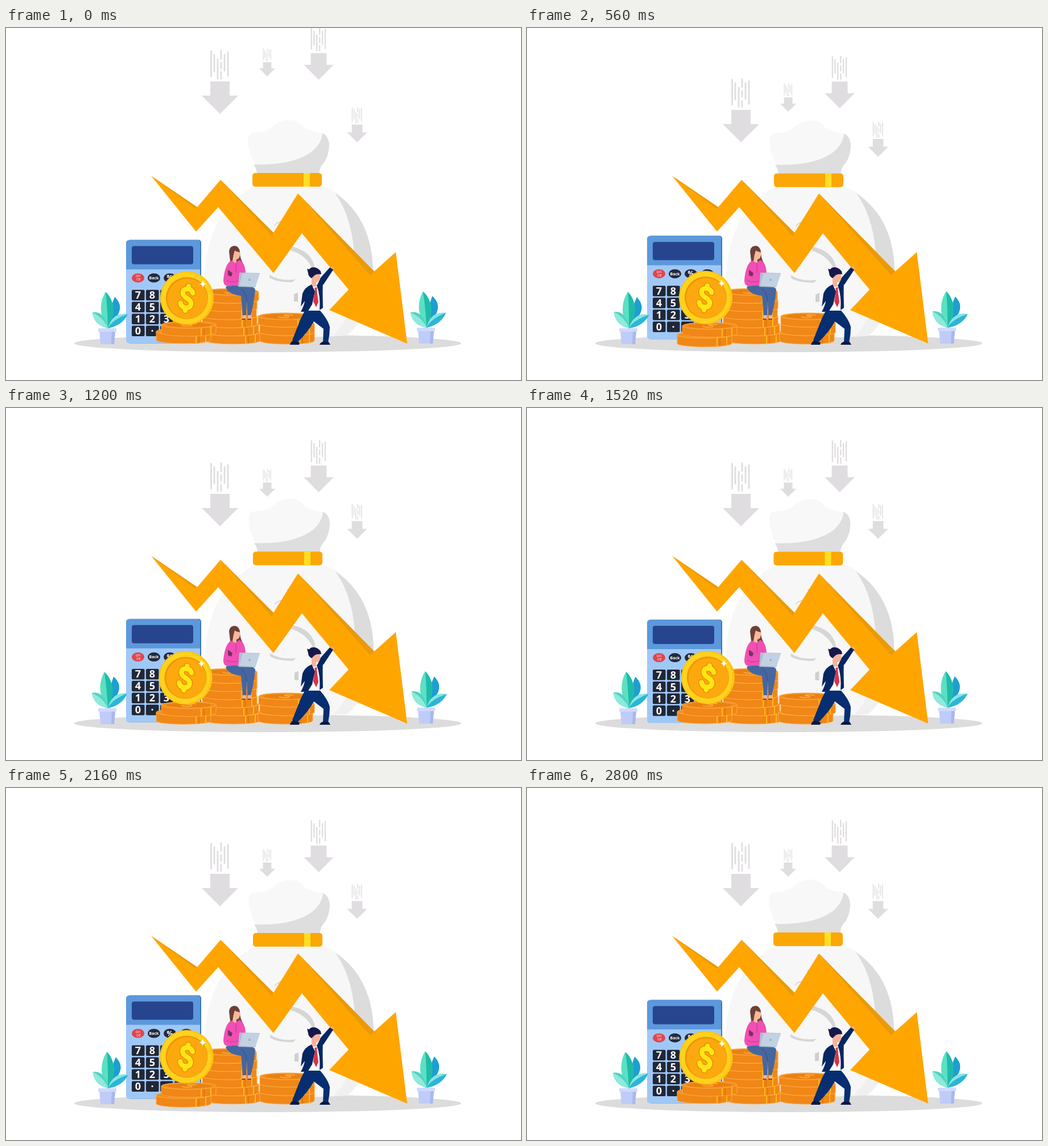
These frames come from a looping animation (905 by 619 pixels, 2880 ms). An HTML page:

```html
<!DOCTYPE html>
<html lang="en">
<head>
<meta charset="utf-8">
<title>Falling market</title>
<style>
html, body { margin: 0; width: 100%; height: 100%; overflow: hidden; background: #fff }
svg { display: block; width: 905px; height: 619px }
text { font-family: "Open Sans", "Noto Sans", sans-serif; font-weight: 700; text-anchor: middle; fill: #fff }
</style>
</head>
<body>
<svg id="stage" viewBox="0 0 905 619"></svg>
<script>
const LOOP = 2880, STEP = 80;
const path = (d, fill, extra = '') => `<path d="${d}" fill="${fill}" ${extra}/>`;
const line = (d, color, width) => path(d, 'none', `stroke="${color}" stroke-width="${width}" stroke-linecap="round" stroke-linejoin="round"`);
const rect = (x, y, w, h, fill, r = 0) => `<rect x="${x}" y="${y}" width="${w}" height="${h}" rx="${r}" fill="${fill}"/>`;
const oval = (x, y, rx, ry, fill, extra = '') => `<ellipse cx="${x}" cy="${y}" rx="${rx}" ry="${ry}" fill="${fill}" ${extra}/>`;
const label = (x, y, size, s, extra = '') => `<text x="${x}" y="${y}" font-size="${size}" ${extra}>${s}</text>`;
const group = (id, ...parts) => `<g id="${id}">${parts.join('')}</g>`;

// Falling arrows: x, scale, first and last height of the tip
const drops = [[376, 1, 151, 208], [549.5, .82, 91, 148], [459, .44, 85, 156], [617, .55, 201, 230]];
const dropShape = path('M0 0L-32-32H-17V-57H17V-32H32Z', '#e0dde0') +
  line('M-15.500-110V-66M-10-104V-75M-4-96V-62M2-111V-97M2-90V-80M2-73V-62M8-104V-76M14-108V-67', '#e0dde0', 2.8);

const bag = group('bag',
  path('M440 276H550Q578 284 594 301Q646 350 645 432Q640 512 598 541L440 548Q350 530 349 433Q354 322 440 276Z', '#f7f7f7'),
  path('M578 290Q645 335 645 432Q643 455 638 475L612 470Q614 440 613 420Q612 337 578 290Z', '#dcdcdc'),
  path('M612 470H638Q628 515 598 541H575Q604 512 612 470Z', '#f0f0f0'),
  line('M472 347Q476 342 483 341M493 323L497 320', '#d2d2d2', 1.5),
  path('M500 384Q548 393 543 441Q537 402 500 391Z', '#d6d6d6'),
  path('M463 434Q482 446 509 442L503 447Q475 447 463 439Z', '#d6d6d6'),
  path('M506 468L513 465V481H506Z', '#cfcfcf'),
  path('M441 257Q440 243 434 233Q423 209 426 192Q428 184 437 184Q457 184 468 174Q482 161 501 162Q515 163 522 173Q531 182 553 184Q567 187 568 207Q566 230 556 240Q551 246 550 257Z', '#f8f8f8'),
  path('M435 240Q505 242 538 217Q555 202 556 185Q567 189 568 207Q566 230 556 240Q551 246 550 257H441Q440 246 435 240Z', '#dedede'),
  rect(433, 255, 122, 24, '#fba706', 5), rect(523, 255, 11, 24, '#ffdf26'));

const trend = path('M255 260L336 315L377 267L470 360L513 291L647 428L685 394L705 555L568 496L602 460L520 361L470 431L373 315L334 358Z', '#ffa500') +
  path('M255 260L336 315L333 318ZM377 267L470 360L467 366ZM513 291L647 428L640 435Z', '#e99a08');

const keyRows = ['789+', '456-', '123×', '0·=÷'];
const calculator = group('calc',
  rect(213, 373, 130, 182, '#3b76bb', 5), rect(211, 373.5, 130, 181.5, '#a0c8f7', 5),
  path('M211 425V379Q211 373.5 217 373.5H335Q341 373.5 341 379V425Z', '#5c98dc'),
  rect(221, 384, 108, 32, '#27448f', 4),
  oval(232, 440, 11, 8, '#e0454c'), label(232, 439, 7, 'on', 'style="font-weight:400"'), label(233, 445, 7, 'ce', 'style="font-weight:400"'),
  [260, 288, 317].map((x, i) => oval(x, 440, 11, 8, '#242a3b') + label(x, 440 + [2.5, 4, 4][i], [7, 12, 12][i], ['Back', '%', '+'][i])).join(''),
  keyRows.map((row, r) => [...row].map((c, i) =>
    rect(221 + i * 25, 461 + r * 21, 22.5, 18.5, '#202737', 2) + label(232 + i * 25, 476.5 + r * 21, 18, c)).join('')).join(''));

// One flat coin seen from the side
function slab(id, x, y, h, r = 48) {
  const side = `M${x - r} ${y}V${y + h}A${r} 6 0 0 0 ${x + r} ${y + h}V${y}Z`;
  return group(id, path(side, '#f08716', 'stroke="#ffab48" stroke-width="1"'),
    line(`M${x + 22} ${y + 6}v${h - 1}M${x + 39} ${y + 4}v${h - 1}`, '#ffb91c', 2),
    line(`M${x + 27} ${y + 6}v${h - 2}`, '#e1780b', 2),
    oval(x, y, r, 6, '#f38f1c', 'stroke="#ffae48" stroke-width="1"'),
    oval(x, y, r - 9, 4, '#ea8012'),
    line(`M${x + 13} ${y - 2}q-17 -2 -15 1q13 1 5 3q-8 1 -15 -1`, '#ffae3f', 1.5));
}
const middle = [399, 396, 393, 392, 393].map((x, i) => slab('mid' + i, x, 535.5 - 14.3 * i, 14.3)).join('') + slab('midTop', 396, 464, 14);
const right = slab('rightLow', 494, 535, 15) + slab('rightMid', 494, 520, 15) + slab('rightTop', 491, 507, 13);
const left = slab('leftLow', 312, 537, 15) + slab('leftTop', 321, 522, 14);

const dollar = 'M9 -10Q7 -16 0 -16Q-9 -16 -8.500 -9Q-8 -3 0 0Q9 4 8.500 10Q8 17 -1 17Q-8 17 -10 10M0 -21V-16M0 17V22';
const coin = group('coin',
  oval(0, 0, 47, 47, '#ffc40f'), oval(-1, 0, 44, 45, '#ffd21f'),
  oval(0, 0, 37, 37, '#ee9605'), oval(1, 1, 35.5, 35.5, '#fca80e'),
  '<g transform="rotate(8)">', line(dollar, '#e58a08', 11), line(dollar, '#ffe614', 8.5), '</g>',
  path('M28 -32Q28.500 -26 34 -25Q28.500 -24 28 -18Q27.500 -24 22 -25Q27.500 -26 28 -32Z', '#fff'));

const woman = [
  path('M392 393Q393 383 402 383Q410 384 411 394Q411 404 416 413Q415 421 409 424L391 424Q390 418 394 410Z', '#6f3f37'),
  path('M398 393Q405 388 411 395Q412 406 405 407V415H398Z', '#f7b99b'),
  path('M395 390Q404 382 411 394Q405 394 402 391Q399 400 398 410Q393 404 395 390Z', '#6f3f37'),
  path('M396 409L403 413L410 408Q420 412 421 431L416 452L388 454Q381 451 382 442Q385 414 396 409Z', '#f04fb3'),
  path('M390 425L398 431L396 437L390 435Z', '#7c2f5f'),
  line('M388 444Q394 448 408 445M404 414V430', '#d0369b', 1.2),
  path('M386 455Q394 452 414 453Q436 453 438 460Q436 483 430 506H424.500L423 480L422 506H416L413 471Q389 468 386 455Z', '#4666a0'),
  line('M413 459Q421 463 423 480', '#334f80', 1),
  path('M416 505H422V512H415ZM425 505H430L431 512H425Z', '#f4b196'),
  line('M415 512H420M425 512H430', '#80462f', 2),
  path('M410 430L446 431L438 456L408 455Z', '#aebfd2'), path('M416 431L446 432L438 455L410 453Z', '#c2d2e2'),
  oval(428, 443, 2, 2, '#9fb2ca')].join('');

const man = [
  path('M568 424L573 419L577 423L572 428Z', '#f4aa94'),
  path('M546 454L553 439L569 421L575 425L558 451Z', '#052762'),
  path('M526 488L535 455H549L551 498H526Z', '#fff'),
  path('M537 432H552V442Q550 447 545 447V455H537Z', '#f7b39c'),
  path('M529 423Q533 426 535 422Q545 418 553 428L554 433Q546 432 542 435L537 440Q531 437 531 431Z', '#17184a'),
  path('M542 457L547 456L546 460L549 482L545 491L540 481L543 461Z', '#de3445'),
  path('M537 451L543 463L538 486L530 499H518Q524 488 525 480L518 490L521 467Q525 456 537 451ZM546 452L557 448Q556 460 557 492L551 496Q553 471 546 452Z', '#052762'),
  path('M525 497H552Q566 513 569 526Q569 539 566 553H557L558 529L541 516Q532 533 512 553L503 549L518 511Z', '#062e70'),
  path('M499 557Q500 552 505 549L516 553L515 557ZM551 557Q552 553 558 551L567 552L570 557Z', '#071946')].join('');

// Two-tone leaf: outer edge, tip, inner edge
const leaf = (c1, tip, c2, light, dark) => {
  const [x, y] = tip.split(' ');
  return path(`M0 0C${c1} ${tip}C${c2} 0 0Z`, light) + path(`M0 0Q${x * .2} ${y * .6} ${tip}C${c2} 0 0Z`, dark);
};
const plant = (id, x, y) => `<g transform="translate(${x} ${y})">` + group(id,
  leaf('3 -16 7 -38', '12 -55', '27 -40 24 -27', '#37c9cf', '#1d9fd0'),
  leaf('-18 -24 -13 -50', '-4 -64', '13 -48 13 -22', '#5be0c4', '#1fbba9'),
  leaf('6 -22 20 -27', '35 -25', '27 -8 12 -2', '#86e6df', '#2db5d8'),
  leaf('-4 -22 -14 -30', '-27 -28', '-25 -9 -12 -3', '#52d2c2', '#8eeada')) +
  path('M-15 4H13L11 28H-13Z', '#bfccf8') + rect(-17, 0, 32, 6, '#d0daff', 1) + path('M7 6H13L11 28H6Z', '#a9b8ed') + '</g>';

const stage = document.getElementById('stage');
stage.innerHTML = oval(460, 554.5, 340, 15.5, '#dcdcdc') +
  drops.map((d, i) => group('drop' + i, dropShape)).join('') +
  bag + trend + calculator + middle + right + left + coin + woman + man + plant('leavesL', 179, 528) + plant('leavesR', 739, 527);

const move = (id, transform) => document.getElementById(id).setAttribute('transform', transform);
const times = [0, 560, 880, 1200, 1760, 2160, 2800];
// Smooth drift through one value per time
function drift(t, ...values) {
  if (t >= 2800) return values[6];
  const i = times.findLastIndex(k => k <= t);
  const u = (t - times[i]) / (times[i + 1] - times[i]);
  return values[i] + (values[i + 1] - values[i]) * (1 - Math.cos(Math.PI * u)) / 2;
}

function draw(t) {
  const fall = 1 - (1 - Math.min(t / 1120, 1)) ** 3;
  drops.forEach(([x, s, from, to], i) => move('drop' + i, `translate(${x} ${from + (to - from) * fall}) scale(${s})`));
  const wave = Math.cos(t / 1440 * 2 * Math.PI + .1);
  move('calc', `translate(0 ${4 * wave - 4.5})`);
  move('leftLow', `translate(0 ${-3.2 * wave})`);
  move('leftTop', `translate(0 ${1 - wave})`);
  move('bag', `translate(${drift(t, 0, 1, 0, 1, 0, 1, 0)} ${drift(t, 0, .7, 0, -2.5, -2, 0, -1)})`);
  move('coin', `translate(${drift(t, 318, 314, 317, 315.5, 319.5, 317.5, 314.5)} ${drift(t, 475, 474, 476.5, 474.5, 473.5, 472.5, 474.5)})`);
  move('rightLow', `translate(${drift(t, 0, -2, -2, -3, -5, 0, -1)} 0)`);
  move('rightTop', `translate(${drift(t, 0, 3, 1, 1, 0, 3, 0)} 0)`);
  move('midTop', `translate(${drift(t, 0, -4, -4, -3, -3, -4, -3)} 0)`);
  move('leavesL', `rotate(${drift(t, 0, 2, 0, -2, 0, 2, -2)})`);
  move('leavesR', `rotate(${drift(t, -2, 1.5, 0, 1.5, 0, 1.5, 1.5)})`);
}

function tick() {
  draw(Math.floor(performance.now() % LOOP / STEP) * STEP);
  requestAnimationFrame(tick);
}
tick();
</script>
</body>
</html>
```
